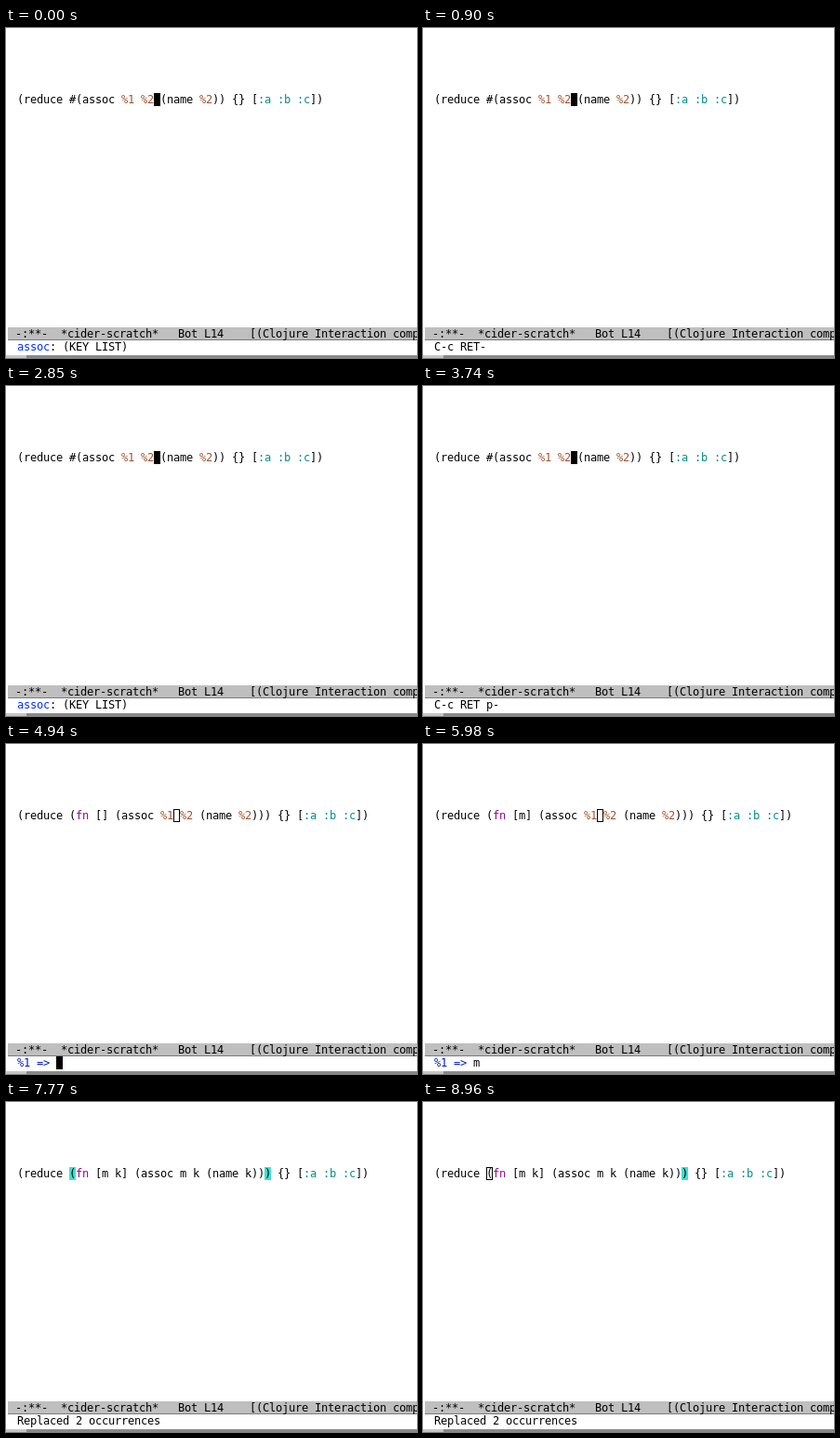
An HTML page that plays this animation: 442x355 px, repeating every 9.06 s.

```html
<!DOCTYPE html>
<html lang="en">
<head>
<meta charset="utf-8">
<title>Promote function literal</title>
<style>
  html, body { margin: 0; width: 100%; height: 100%; overflow: hidden; background: #fff; }
  svg { display: block; width: 442px; height: 355px; }
  text { font: 12px "DejaVu Sans Mono", monospace; white-space: pre; }
</style>
</head>
<body>
<svg id="stage" viewBox="0 0 442 355" xmlns="http://www.w3.org/2000/svg">
  <rect width="442" height="355" fill="#fff"/>
  <rect x="2" y="322" width="440" height="14" fill="#bfbfbf"/>
  <rect x="2" y="335" width="440" height="1" fill="#7a7a7a"/>
  <rect y="352" width="442" height="3" fill="#888"/>
  <rect y="352" width="22" height="3" fill="#c6c6c6"/>
  <g id="modeline"></g>
  <g id="code"></g>
  <g id="echo"></g>
</svg>
<script>
const LOOP = 9060;
const CELL = 7, ROW = 14, LEFT = 12, ASCENT = 11;
const CODE_Y = 70, ECHO_Y = 336;
const BLACK = '#000', SIENNA = '#a0522d', PURPLE = '#8b0a8b', CYAN = '#008b8b',
      BLUE = '#0030ff', PROMPT = '#0019cd', MATCH = '#40e0d0';

const $ = id => document.getElementById(id);

function add(parent, tag, attrs, content) {
  const el = document.createElementNS('http://www.w3.org/2000/svg', tag);
  for (const key in attrs) el.setAttribute(key, attrs[key]);
  if (content) el.textContent = content;
  parent.appendChild(el);
}

// Each run is [text, colour, bold]; every character sits on the terminal grid.
function drawRuns(parent, runs, left, baseline) {
  let col = 0;
  for (const [text, fill = BLACK, bold] of runs) {
    const xs = [...text].map((_, i) => left + (col + i) * CELL);
    if (text.trim()) {
      add(parent, 'text', {
        x: xs.join(' '), y: baseline, fill, 'font-weight': bold ? 700 : 400
      }, text);
    }
    col += text.length;
  }
}

function highlight(source) {
  return source.split(/(%\d|:\w+|\bfn\b)/).filter(Boolean).map(part => {
    if (part[0] === '%') return [part, SIENNA];
    if (part[0] === ':') return [part, CYAN];
    return [part, part === 'fn' ? PURPLE : BLACK];
  });
}

// A cursor is { col, type }, where type is 'solid' or 'hollow'.
function drawRow(parent, runs, top, cursor, matches = []) {
  parent.replaceChildren();
  const block = (col, fill) => add(parent, 'rect', {
    x: LEFT + col * CELL, y: top, width: CELL, height: ROW, fill
  });
  matches.forEach(col => block(col, MATCH));
  if (cursor) block(cursor.col, BLACK);
  if (cursor && cursor.type === 'hollow') {
    add(parent, 'rect', {
      x: LEFT + cursor.col * CELL + 1, y: top + 1,
      width: CELL - 2, height: ROW - 2, fill: '#fff'
    });
  }
  drawRuns(parent, runs, LEFT, top + ASCENT);
  if (cursor && cursor.type === 'solid') {
    const char = runs.map(run => run[0]).join('')[cursor.col];
    if (char && char !== ' ') {
      block(cursor.col, BLACK);
      add(parent, 'text', {
        x: LEFT + cursor.col * CELL, y: top + ASCENT, fill: '#fff'
      }, char);
    }
  }
}

const solid = col => ({ col, type: 'solid' });
const hollow = col => ({ col, type: 'hollow' });
const line = fn => `(reduce ${fn} {} [:a :b :c])`;
const prompt = (name, typed = '') => [[name + ' =>', PROMPT], [' ' + typed]];
const ELDOC = [['assoc', BLUE], [': (KEY '], ['LIST', BLACK, true], [')']];
const DONE = [['Replaced 2 occurrences']];

// Each step changes only the listed parts of the screen.
const steps = [
  [0, { code: line('#(assoc %1 %2 (name %2))'), point: solid(21), echo: ELDOC, input: null, matches: [] }],
  [300, { point: null }],
  [450, { echo: [['C-c-']] }],
  [750, { point: solid(21) }],
  [900, { echo: [['C-c RET-']] }],
  [1350, { point: null }],
  [1500, { echo: ELDOC }],
  [1800, { point: solid(21) }],
  [2250, { point: null, echo: [['C-c RET-']] }],
  [2850, { point: solid(21), echo: ELDOC }],
  [3300, { point: null, echo: [['C-c RET p-']] }],
  [3740, { point: solid(21) }],
  [3890, { code: line('(fn [] (assoc %1 %2 (name %2)))'), point: hollow(24), echo: prompt('%1'), input: solid(6) }],
  [4340, { input: null }],
  [4940, { input: solid(6) }],
  [5380, { input: null }],
  [5680, { echo: prompt('%1', 'm'), input: solid(7) }],
  [5980, { code: line('(fn [m] (assoc %1 %2 (name %2)))'), point: hollow(25), input: null }],
  [6130, { code: line('(fn [m] (assoc m %2 (name %2)))'), point: hollow(27), echo: prompt('%2'), input: solid(6) }],
  [6580, { input: null }],
  [6720, { echo: prompt('%2', 'k'), input: solid(7) }],
  [7170, { input: null }],
  [7320, { code: line('(fn [m k] (assoc m k (name k)))'), point: solid(8), echo: DONE }],
  [7470, { matches: [8, 38] }],
  [7770, { point: null }],
  [8370, { point: solid(8) }],
  [8820, { point: null }],
  [8960, { point: hollow(8) }]
];

let shown = -1;

function render(time) {
  const now = time % LOOP;
  const count = steps.filter(([at]) => at <= now).length;
  if (count === shown) return;
  shown = count;
  const s = Object.assign({}, ...steps.slice(0, count).map(step => step[1]));
  drawRow($('code'), highlight(s.code), CODE_Y, s.point, s.matches);
  drawRow($('echo'), s.echo, ECHO_Y, s.input);
}

drawRuns($('modeline'), [
  ['-:**-  '], ['*cider-scratch*', BLACK, true],
  ['   Bot L14    [(Clojure Interaction comp']
], 10, 333);

const start = performance.now();
function tick() {
  render(performance.now() - start);
  requestAnimationFrame(tick);
}
tick();
</script>
</body>
</html>
```
